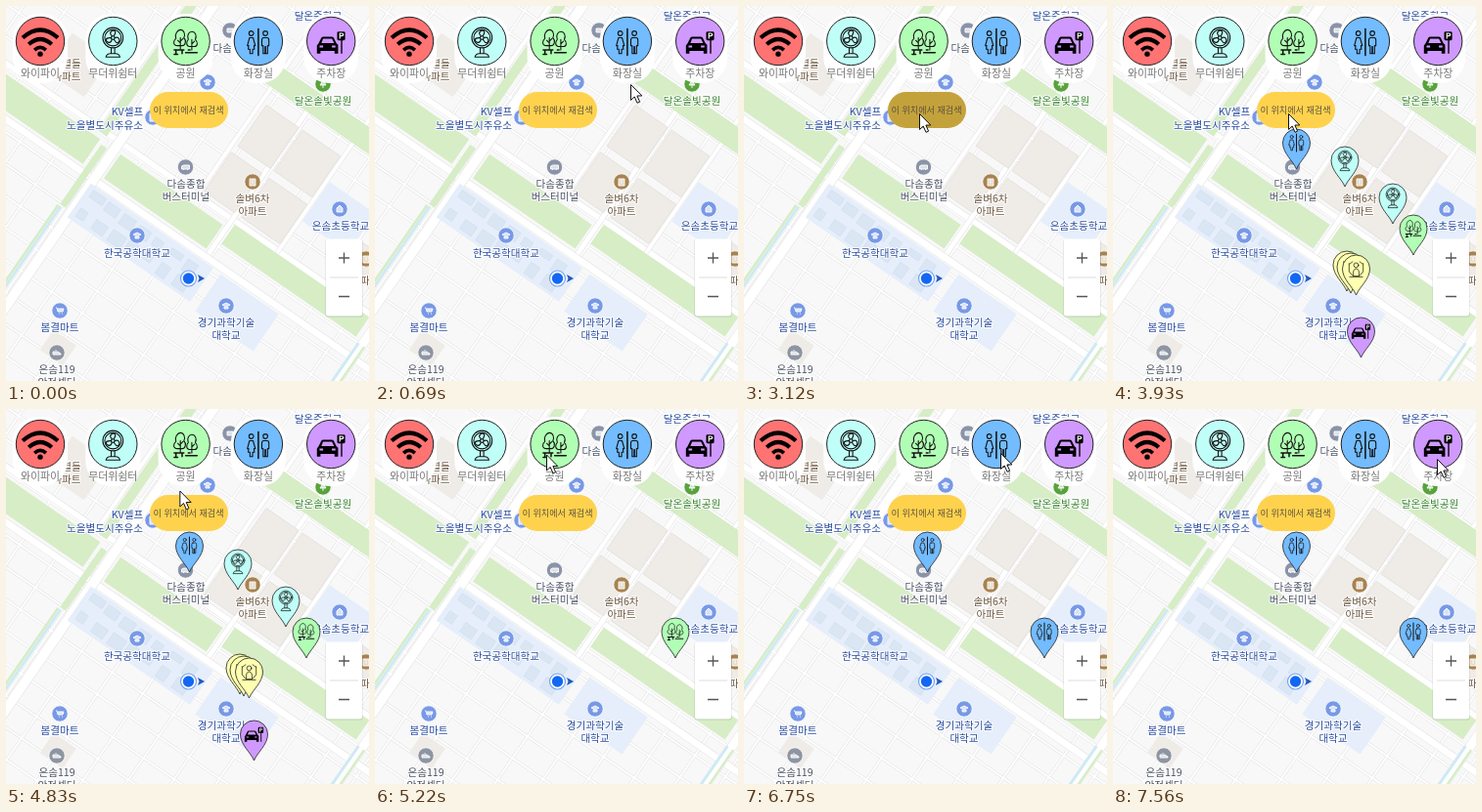
An HTML page for the animation above (8 s loop, 371 by 384 pixels).

```html
<!DOCTYPE html>
<html lang="ko">
<head>
<meta charset="utf-8">
<style>
  html, body { margin: 0; width: 100%; height: 100%; overflow: hidden; background: #f8f8f8; }
  svg { display: block; width: 371px; height: 384px; }
  text { font-family: "Noto Sans CJK KR", "Noto Sans CJK", "Noto Sans CJK JP", sans-serif; text-anchor: middle; }
  .place { font-size: 10.6px; font-weight: 500; paint-order: stroke; stroke: #fff; stroke-width: 2px; stroke-linejoin: round; }
  .label { font-size: 10.9px; fill: #777; }
  .line { fill: none; stroke: #111; stroke-width: 1.2; stroke-linecap: round; stroke-linejoin: round; }
</style>
</head>
<body>
<svg viewBox="0 0 371 384">
  <defs>
    <g id="wifi" fill="none" stroke="#000" stroke-width="4.800">
      <path d="M-20 -5Q0 -23 20 -5M-13 2.500Q0 -9 13 2.500"/>
      <path d="M-6.500 9Q0 3 6.500 9" stroke-width="4"/>
      <circle cy="13.500" r="3" fill="#000" stroke="none"/>
    </g>
    <g id="fan" class="line">
      <circle cy="-5" r="11.5"/><circle cy="-5" r="9.3"/><circle cy="-5" r="2"/>
      <path id="blade" d="M-1 -7C-5 -10 -2 -14 2 -13C4 -11 2 -9 1 -7"/>
      <use href="#blade" transform="rotate(120 0 -5)"/>
      <use href="#blade" transform="rotate(240 0 -5)"/>
      <path d="M-2 7V13M2 7V13M-8 17Q-7 13 -3 13H3Q7 13 8 17Z"/>
    </g>
    <g id="park" class="line">
      <path d="M-6 8V-5M-6 1L-9 -2M-6 -1L-3 -4M-9 4C-15 4 -14 -2 -11 -4C-13 -9 -9 -14 -6 -14C-2 -14 0 -9 -2 -5C1 -2 0 4 -4 4Z"/>
      <path d="M7 9V-3M7 2L10 -1M4 5C0 4 1 -1 3 -3C1 -8 4 -12 7 -12C11 -12 13 -7 11 -3C14 0 14 5 10 5Z"/>
      <path d="M-13 9H-2M-11 13V9M-4 13V9M0 12H13M-13 14H-9M3 9H5" stroke-width="1.7"/>
    </g>
    <g id="toilet" class="line">
      <path d="M0 -15V15" stroke-width="1.7"/>
      <circle cx="-8" cy="-10" r="2.6"/><circle cx="8" cy="-10" r="2.6"/>
      <path d="M-10 -5H-6L-3.500 4H-5L-4.500 8H-6.500V13H-9.500V8H-11.500L-11 4H-12.500Z"/>
      <path d="M6 -5H10Q12 -5 12 -2V4H10.500V13H8.300V5H7.700V13H5.500V4H4V-2Q4 -5 6 -5Z"/>
    </g>
    <g id="car">
      <path d="M-16 4L-14 1L-11 -5Q-10 -6 -9 -6H1Q2 -6 3 -5L6 1L8 3V13H4V10H-12V13H-16Z"/>
      <path d="M-11 1L-9 -4H1L3.500 1Z" fill="#cf99ff"/>
      <path d="M-13 5H-9M1 5H5" stroke="#cf99ff" stroke-width="2"/>
      <rect x="7" y="-12" width="9" height="10" rx="1.5"/>
      <path d="M12 -3V13" stroke="#000" stroke-width="1.5"/>
      <path d="M10 -4V-10H12Q14 -10 14 -8.500T12 -7H10" fill="none" stroke="#fff" stroke-width="1.3"/>
    </g>
    <g id="rest" class="line">
      <circle cy="-6" r="4"/>
      <path d="M-5 12Q-6 0 0 0T5 12ZM-12 -9V5L-6 12M12 -9V5L6 12M-11 -8L-6 -12M11 -8L6 -12M-11 14H11"/>
    </g>
    <path id="drop" d="M0 27C-3 19 -14 11 -14 0A14 14 0 1 1 14 0C14 11 3 19 0 27Z" stroke="#222" stroke-width=".8"/>
  </defs>

  <rect width="371" height="384" fill="#f8f8f8"/>
  <g id="land" transform="translate(92 160) rotate(34.6)"></g>
  <g id="places"></g>

  <g id="here">
    <circle cx="186.5" cy="279" r="8" fill="#fff" stroke="#6f9df0" stroke-width="1.1"/>
    <circle cx="186.5" cy="279" r="5.7" fill="#1268f3"/>
    <path d="M196 275L203 279L196 283L197.5 279Z" fill="#2459b8"/>
  </g>
  <g id="pins"></g>

  <g id="menu"></g>
  <rect id="button" x="147" y="88" width="80" height="37" rx="18.5"/>
  <text id="search" x="186.5" y="109.5" font-size="9.1" fill="#5c5340">이 위치에서 재검색</text>

  <rect x="326.5" y="239" width="38" height="79.5" rx="2" fill="#000" opacity=".13"/>
  <rect x="327" y="238.5" width="37" height="79" rx="2" fill="#fff"/>
  <path d="M331 278H360" stroke="#ddd"/>
  <path d="M340 258H351M345.5 252.5V263.5M340 297.5H351" stroke="#555" stroke-width="1.3"/>

  <path id="cursor" d="M.5 .5V16.5L4.2 13L7 19.3L9.6 18.2L6.9 12H11.8Z" fill="#fff" stroke="#111" stroke-width="1"/>
</svg>
<script>
const $ = id => document.getElementById(id);
const LOOP = 8000, STEP = 30;
const color = { wifi: '#ff7373', fan: '#bffff8', park: '#b1ffb5', toilet: '#73bcff', car: '#cf99ff', rest: '#ffffb0' };

// Map, in axes that follow the streets.
const rect = (u1, v1, u2, v2, fill, edge = 'none') =>
  `<rect x="${u1}" y="${v1}" width="${u2 - u1}" height="${v2 - v1}" fill="${fill}" stroke="${edge}" stroke-width=".7"/>`;
const road = (d, w) =>
  `<path d="${d}" stroke="#e2e2e2" stroke-width="${w + 1}"/><path d="${d}" stroke="#fff" stroke-width="${w}"/>`;

function drawLand() {
  const green = '#d6edc6', beige = '#efebe7', blue = '#e5eefa', edge = '#e3deda';
  let streets = '';
  for (let u = -228; u < 480; u += 38) streets += `M${u} -330V330`;
  for (let v = -324; v < 330; v += 27) streets += `M-240 ${v}H480`;
  let out = road(streets, 2);
  out += road('M-240 -31H480', 6) + road('M-240 16H480', 7) + road('M205 -330V-28', 4) + road('M104 -330V-28', 4);
  out += road('M8 -330V330', 10) + road('M-20 -330V-26', 4) + road('M330 -330V330', 9) + road('M148 -330V12', 5);
  out += rect(-170, -22, -10, 9, green) + rect(16, -21, 143, 9, green);
  out += rect(153, -28, 320, -4, green) + rect(338, -28, 420, -4, green);
  out += rect(-16, -215, -6, -28, green) + rect(-6, -18, 1, 56, green) + rect(80, -188, 240, -165, green);
  out += rect(108, -87, 146, -38, beige, edge) + rect(155, -87, 202, -38, beige, edge);
  out += rect(110, -147, 150, -96, beige, edge) + rect(155, -147, 202, -96, beige, edge);
  out += rect(268, -87, 294, -38, beige, edge) + rect(-95, -95, -48, -48, beige) + rect(62, 166, 90, 190, beige);
  out += rect(8, 21, 160, 63, blue) + rect(170, 22, 242, 68, blue) + rect(208, -119, 264, -70, blue);
  let seed = 7;
  const rnd = () => (seed = seed * 16807 % 2147483647) / 2147483647;
  for (let i = 0; i < 14; i++) {
    const u = 14 + (i % 7) * 20, v = 25 + (i > 6) * 19 + rnd() * 4;
    out += rect(u, v, u + 8 + rnd() * 9, v + 6 + rnd() * 8, '#dae6f3', '#d2dfee');
  }
  out += '<path d="M-4 58V330M326 0V330" stroke="#cfeaf3" stroke-width="3"/><path d="M-7 58V330M333 0V330" stroke="#d6edc6" stroke-width="2.5"/>';
  $('land').innerHTML = out;
}

function drawPlaces() {
  const navy = '#25489c', gray = '#474f60', brown = '#6a543d', leaf = '#35822a';
  const campus = 'M-4 -1L0 -3L4 -1L0 1ZM-2 1V3H2V1', tower = 'M-3 4V-3H3V4ZM-1 -1H1M-1 1H1';
  const spots = [
    [150, 114, '#7899e6', 'M-3 4V-4H2V4ZM2 -2L4 0V3'], [206, 78, '#7899e6', campus],
    [134, 235, '#7899e6', campus], [225, 307, '#7899e6', campus],
    [341, 208, '#7899e6', 'M-3 3V-1L0 -4L3 -1V3Z'],
    [55, 312, '#7899e6', 'M-4 -3H-3L-2 1H3L4 -2H-2M-1 3H0M2 3H3'],
    [183.5, 165, '#8b93a8', 'M-4 2V-1L-2 -2H4V2ZM-2 3V2M2 3V2'],
    [52, 355, '#8e95a2', 'M-4 2V-1H1L4 1V2ZM-1 -2V-3'], [229, 25, '#8b93a8', 'M-3 -2H3V2H-3Z'],
    [252, 180, '#a78350', tower], [368, 259, '#a78350', tower], [324, 80, '#58a33c', 'M0 4V0M-3 1L0 -4L3 1Z']
  ];
  const names = [
    ['KV셀프', 124, 112, navy], ['노을별도시주유소', 101, 125.5, navy],
    ['다솜종합', 184, 185.5, gray], ['버스터미널', 184, 198.5, gray],
    ['솔벼6차', 252, 201, brown], ['아파트', 252, 214, brown],
    ['은솜초등학교', 342, 229, navy], ['한국공학대학교', 134, 256.5, navy],
    ['경기과학기술', 225, 328, navy], ['대학교', 225, 341, navy],
    ['봄결마트', 55, 333, navy], ['은솜119', 52, 376, gray], ['안전센터', 52, 388.5, gray],
    ['달온솔빛공원', 324, 100.5, leaf], ['달온중학교', 319, 13.5, navy],
    ['다솜시청', 231, 47, gray], ['별들', 67, 63, brown], ['아파트', 62, 76, brown], ['아파트', 367, 285, brown]
  ];
  $('places').innerHTML = spots.map(([x, y, c, glyph]) =>
    `<g transform="translate(${x} ${y})"><circle r="8.2" fill="${c}" stroke="#fff" stroke-width=".8"/><path d="${glyph}" fill="#fff" stroke="#fff" stroke-width=".9" fill-opacity=".7"/></g>`).join('') +
    names.map(([s, x, y, c]) => `<text class="place" x="${x}" y="${y}" fill="${c}">${s}</text>`).join('');
}

function drawMenu() {
  const items = [['wifi', '와이파이'], ['fan', '무더위쉼터'], ['park', '공원'], ['toilet', '화장실'], ['car', '주차장']];
  $('menu').innerHTML = items.map(([kind, name], i) =>
    `<g transform="translate(${35 + i * 74.3} 36)">
      <rect x="-28" y="-28" width="56" height="71" rx="26" fill="#fff" opacity=".96"/>
      <circle r="24.7" fill="${color[kind]}" stroke="#222" stroke-width="1"/>
      <use href="#${kind}" transform="translate(0 1) scale(.9)"/><text class="label" y="37">${name}</text></g>`).join('');
}

// kind, x, y, shown from, shown until
const pins = [
  ['toilet', 187.5, 140, 3930, 5220], ['fan', 237, 158, 3930, 5220], ['fan', 286, 196, 3930, 5220],
  ['park', 307, 228, 3930, 6750],
  ['rest', 239, 265, 3930, 5220], ['rest', 243, 267, 3930, 5220], ['rest', 248.5, 269, 3930, 5220],
  ['car', 253.5, 333, 3930, 5220],
  ['toilet', 187.5, 140, 6750, LOOP], ['toilet', 307, 228, 6750, LOOP]
];

function drawPins() {
  $('pins').innerHTML = pins.map(([kind, x, y]) =>
    `<g transform="translate(${x} ${y})"><use href="#drop" fill="${color[kind]}"/><use href="#${kind}" transform="scale(.6)"/></g>`).join('');
}

// start, end, target x, target y, upward bow
const moves = [
  [480, 900, 162, 116, 0], [1050, 1110, 179, 110, 0], [4740, 4980, 175, 46.5, 0],
  [5490, 5820, 262, 45, 3], [7170, 7560, 331, 51, 3]
];

function cursorAt(t) {
  let x = 382, y = 36;
  for (const [start, end, tx, ty, bow] of moves) {
    if (t < start) break;
    const count = (end - start) / STEP + 1;
    const p = Math.min(1, (Math.floor((t - start) / STEP) + 1) / count);
    const e = p * p * (3 - 2 * p);
    x += (tx - x) * e;
    y += (ty - y) * e - bow * 4 * e * (1 - e);
  }
  return [x, y];
}

function frame() {
  const t = performance.now() % LOOP;
  const pressed = t >= 3120 && t < 3150;
  $('button').setAttribute('fill', pressed ? '#c4a23b' : '#ffd24d');
  $('cursor').setAttribute('transform', `translate(${cursorAt(t)})`);
  pins.forEach(([, , , from, until], i) => {
    $('pins').children[i].style.display = t >= from && t < until ? '' : 'none';
  });
  requestAnimationFrame(frame);
}

drawLand();
drawPlaces();
drawMenu();
drawPins();
frame();
</script>
</body>
</html>
```
